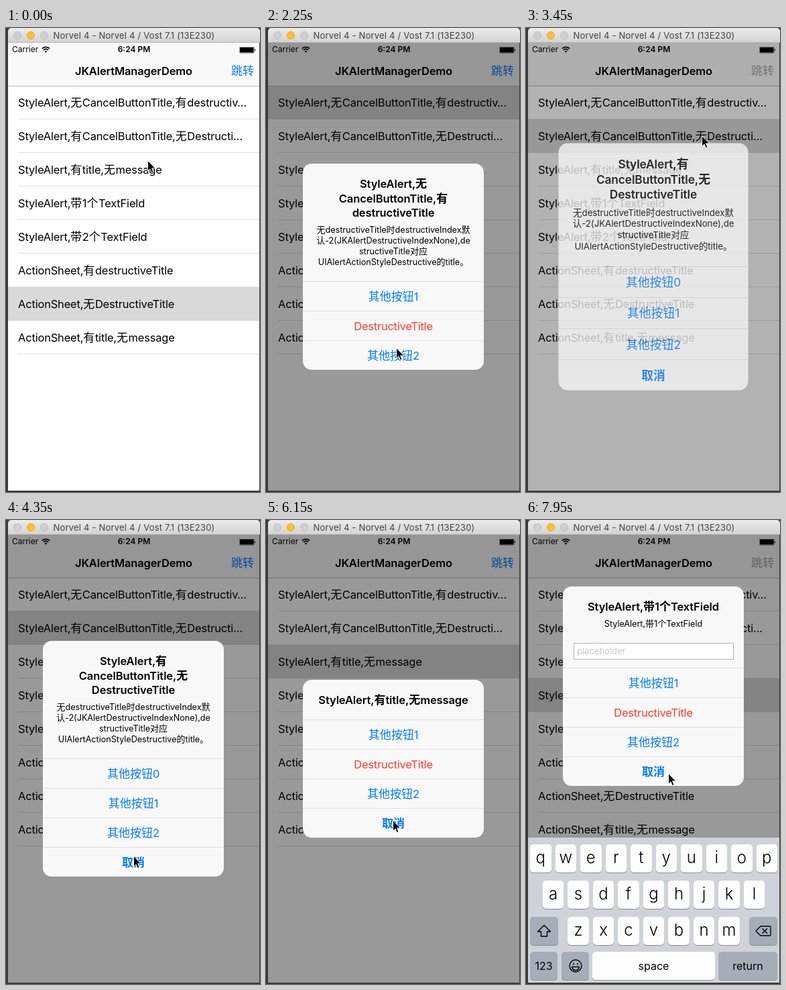
Recreate the animation shown at these times as an HTML page. Size 379 by 691 pixels, loop 8 s.

```html
<!DOCTYPE html>
<html lang="zh-CN">
<head>
<meta charset="utf-8">
<title>JKAlertManagerDemo</title>
<style>
* { box-sizing: border-box; }
html, body { margin: 0; width: 100%; height: 100%; overflow: hidden; background: #3a3a3a; }
body { position: relative; font: 400 16.5px Inter, "Noto Sans CJK SC", "Noto Sans CJK", sans-serif; letter-spacing: -.24px; color: #000; white-space: nowrap; }
div, svg { position: absolute; }
i { font: normal 17px/0 "Noto Sans CJK SC", "Noto Sans CJK", sans-serif; font-weight: inherit; letter-spacing: 0; }

.bar { left: 3px; top: 0; width: 376px; height: 22px; border-radius: 5px 5px 0 0; background: linear-gradient(#ebebeb, #d3d3d3); border-bottom: 1px solid #b4b4b4; font-size: 13px; line-height: 23px; letter-spacing: .2px; color: #424242; text-align: center; }
.light { top: 5px; width: 12px; height: 12px; border-radius: 50%; background: #d0d0d0; border: 1px solid #bcbcbc; }
.light.on { background: #fdbd30; border-color: #e6a72a; }

.screen { left: 3px; top: 22px; width: 375px; height: 667px; overflow: hidden; background: #fefefe; }
.nav { width: 375px; height: 65px; background: #f9f9f9; border-bottom: 1px solid #bcbcbc; }
.nav div { line-height: 20px; }
.carrier { left: 6px; top: 0; font-size: 12px; letter-spacing: 0; }
.clock { left: 0; top: 0; width: 376px; text-align: center; font-size: 12px; font-weight: 600; letter-spacing: 0; }
.title { width: 375px; top: 32px; text-align: center; font-weight: 600; letter-spacing: -.15px; }
.jump { right: 8px; top: 32px; }

.row { left: 0; width: 375px; height: 50px; line-height: 50px; padding-left: 15px; letter-spacing: -.19px; }
.row i { margin-right: .6px; }
.row::after { content: ""; position: absolute; left: 15px; right: 0; bottom: 0; height: 1px; background: #dfdfe0; }
.row.sel::before { content: ""; position: absolute; left: 0; top: 0; width: 375px; height: 50px; background: #d9d9d9; box-shadow: 0 -1px #e6e6e6; }
.row.sel::after { display: none; }
.row span { position: relative; }
.dim { width: 375px; height: 667px; background: #000; }

.alert { left: 52px; width: 270px; border-radius: 13px; overflow: hidden; background: #f8f8f8; text-align: center; }
.alert div { width: 270px; }
.head { font-weight: 600; letter-spacing: -.1px; line-height: 22px; }
.msg { font-size: 12.7px; line-height: 16px; letter-spacing: -.05px; }
.msg i { font-size: 13px; }
.btn { height: 44px; line-height: 44px; border-top: 1px solid #dedee0; color: #007aff; }
.btn.red { color: #ff3b30; }
.btn.bold { font-weight: 600; }
.alert .field { left: 16px; top: 84px; width: 239px; height: 25px; padding-left: 4px; line-height: 23px; border: 1px solid #b4b4b4; background: #fff; color: #c6c6ca; font-size: 13px; letter-spacing: 0; text-align: left; }

.keys { top: 451px; width: 375px; height: 216px; background: #cfd3d9; }
.key { height: 42px; line-height: 39px; border-radius: 5px; background: #fdfdfd; box-shadow: 0 1px 0 #898c91; text-align: center; font-size: 24px; font-weight: 300; letter-spacing: 0; }
.key.wide { font-size: 16px; font-weight: 400; line-height: 42px; }
.key.dark { background: #a6adb8; }
.key svg { left: 50%; top: 50%; margin: -12px; fill: none; stroke: #000; stroke-width: 1.4; stroke-linejoin: round; stroke-linecap: round; }
#cursor { left: 0; top: 0; overflow: visible; }
</style>
</head>
<body>
<div class="bar">
  <div class="light" style="left:8px"></div>
  <div class="light on" style="left:28px"></div>
  <div class="light" style="left:48px"></div>
  <span>Norvel 4 - Norvel 4 / Vost 7.1 (13E230)</span>
</div>
<div class="screen" id="screen">
  <div class="nav" id="nav">
    <div class="carrier">Carrier</div>
    <svg style="left:50px;top:5px" width="13" height="10" viewBox="0 0 13 10" fill="none" stroke="#000" stroke-width="1.8">
      <path d="M.8 3.6a8.2 8.2 0 0 1 11.4 0M2.9 5.8a5.1 5.1 0 0 1 7.2 0"/>
      <path d="M6.5 9.8L4.6 7.8a2.8 2.8 0 0 1 3.8 0z" fill="#000" stroke="none"/>
    </svg>
    <div class="clock">6:24 PM</div>
    <svg style="left:345px;top:6px" width="26" height="10">
      <rect x=".25" y=".25" width="22" height="9" rx="1.8" fill="none" stroke="#000" stroke-width=".5"/>
      <rect x="1" y="1" width="20.5" height="7.5" rx="1"/>
      <path d="M23.2 3.2a1.6 1.6 0 0 1 0 3z"/>
    </svg>
    <div class="title">JKAlertManagerDemo</div>
    <div class="jump" id="jump">跳转</div>
  </div>
</div>
<svg id="cursor" width="13" height="20">
  <path d="M.5 .5V16.2L4 12.9L6.4 18.6L9 17.5L6.6 11.9H11.6Z" fill="#000" stroke="#fff" stroke-width="1"/>
</svg>
<script>
const LOOP = 8000, STEP = 150;
const screenEl = document.getElementById('screen');
const jump = document.getElementById('jump');
const cursor = document.getElementById('cursor');

const mixed = s => s.replace(/[\u3000-\u9fff]+/g, '<i>$&</i>');

function add(parent, cls, html = '', style = {}) {
  const el = document.createElement('div');
  el.className = cls;
  el.innerHTML = html;
  for (const k in style) el.style[k] = typeof style[k] === 'number' ? style[k] + 'px' : style[k];
  parent.appendChild(el);
  return el;
}

jump.innerHTML = mixed(jump.textContent);

const rows = [
  'StyleAlert,无CancelButtonTitle,有destructiv…',
  'StyleAlert,有CancelButtonTitle,无Destructi…',
  'StyleAlert,有title,无message',
  'StyleAlert,带1个TextField',
  'StyleAlert,带2个TextField',
  'ActionSheet,有destructiveTitle',
  'ActionSheet,无DestructiveTitle',
  'ActionSheet,有title,无message'
].map((s, i) => add(screenEl, 'row', `<span>${mixed(s)}</span>`, { top: 64 + 50 * i }));
screenEl.appendChild(document.getElementById('nav'));
const dim = add(screenEl, 'dim');

// Keyboard
const keys = add(screenEl, 'keys');
const key = (left, top, width, html, cls = '') => add(keys, 'key ' + cls, html, { left, top, width });
const icon = d => `<svg width="24" height="24"><path d="${d}"/></svg>`;
[['qwertyuiop', 3, 10], ['asdfghjkl', 21.75, 64], ['zxcvbnm', 59.25, 118]].forEach(([s, x, y]) =>
  [...s].forEach((c, i) => key(x + 37.5 * i, y, 31.5, c)));
key(3, 118, 42, icon('M12 3.5L21.5 13H16.5V20H7.5V13H2.5Z'), 'dark');
key(330, 118, 42, icon('M8 5H21.5Q23 5 23 6.5V17.5Q23 19 21.5 19H8L1 12ZM11 8.7L17.6 15.3M17.6 8.7L11 15.3'), 'dark');
key(3, 170, 41, '123', 'wide dark');
key(50, 170, 41, icon('M3 12a9 9 0 1 0 18 0a9 9 0 1 0-18 0M6.5 13.5H17.5Q16.5 18.5 12 18.5T6.5 13.5M9 8.2V10M15 8.2V10'), 'wide dark');
key(96, 170, 183, 'space', 'wide');
key(284, 170, 88, 'return', 'wide dark');

// Alerts: each shows at `from` and is dismissed at `to`
const note = ['无destructiveTitle时destructiveIndex默', '认-2(JKAlertDestructiveIndexNone),de',
  'structiveTitle对应', 'UIAlertActionStyleDestructive的title。'];
const choices = ['其他按钮1', 'DestructiveTitle', '其他按钮2'];
const alerts = [
  { from: 450, to: 2250, head: ['StyleAlert,无', 'CancelButtonTitle,有', 'destructiveTitle'],
    msg: note, size: 175, btns: choices },
  { from: 3300, to: 4350, head: ['StyleAlert,有', 'CancelButtonTitle,无', 'DestructiveTitle'],
    msg: note, size: 175, btns: ['其他按钮0', '其他按钮1', '其他按钮2', '取消'] },
  { from: 5100, to: 6150, head: ['StyleAlert,有title,无message'],
    msg: [], size: 59, btns: [...choices, '取消'] },
  { from: 7050, to: LOOP, head: ['StyleAlert,带1个TextField'],
    msg: ['StyleAlert,带1个TextField'], size: 121, btns: [...choices, '取消'], field: true }
];
for (const a of alerts) {
  const height = a.size + 44 * a.btns.length;
  const mid = a.field ? 225.5 : 333.5;
  a.el = add(screenEl, 'alert', '', { height, top: Math.round(mid - height / 2) });
  a.head.forEach((s, i) => add(a.el, 'head', mixed(s), { top: 19 + 21.5 * i }));
  const msgTop = a.field ? 48 : 91;
  a.msg.forEach((s, i) => add(a.el, 'msg', mixed(s), { top: msgTop + 16 * i }));
  if (a.field) add(a.el, 'field', 'placeholder');
  a.btns.forEach((s, i) => {
    const cls = s === '取消' ? ' bold' : s[0] === 'D' ? ' red' : '';
    add(a.el, 'btn' + cls, mixed(s), { top: a.size + 44 * i });
  });
}

// Pointer stops: time, x, y
const path = [
  [0, 211, 197], [300, 190, 110], [750, 190, 110], [1050, 192, 182], [1950, 194, 476],
  [2300, 194, 476], [3000, 262, 160], [3550, 262, 160], [4200, 190, 500], [4400, 190, 500],
  [4950, 178, 213], [5550, 178, 213], [5700, 181, 262], [5850, 181, 262], [6150, 189, 447],
  [6250, 189, 447], [6900, 178, 264], [7300, 178, 264], [7900, 212, 377], [LOOP, 212, 377]
];
function pointer(t) {
  const n = path.findIndex(p => p[0] > t);
  const [t0, x0, y0] = path[n - 1], [t1, x1, y1] = path[n];
  const u = (t - t0) / (t1 - t0), e = u * u * (3 - 2 * u);
  return [x0 + (x1 - x0) * e, y0 + (y1 - y0) * e];
}

// Critically damped spring from 0 to 1
function spring(ms) {
  const w = Math.max(0, ms) * .0183;
  return 1 - (1 + w) * Math.exp(-w);
}

function draw(now) {
  const t = Math.floor(now % LOOP / STEP) * STEP;
  let shade = 0, picked = 6, grey = false;
  alerts.forEach((a, i) => {
    const grow = spring(t - a.from);
    const show = grow * (1 - spring(t - a.to));
    a.el.style.opacity = show;
    a.el.style.visibility = show > .004 ? 'visible' : 'hidden';
    a.el.style.transform = grow > .997 ? 'none' : `scale(${1.2 - .2 * grow})`;
    shade = Math.max(shade, show);
    if (t >= a.from) picked = i;
    if (t > a.from && t < a.to) grey = true;
    if (a.field) keys.style.transform = `translateY(${216 * (1 - show)}px)`;
  });
  dim.style.opacity = shade * .4;
  jump.style.color = grey ? '#a4a4a4' : '#007aff';
  rows.forEach((r, i) => r.classList.toggle('sel', i === picked));
  const [x, y] = pointer(t);
  cursor.style.transform = `translate(${Math.round(x)}px, ${Math.round(y)}px)`;
}

const start = performance.now();
(function tick() {
  draw(performance.now() - start);
  requestAnimationFrame(tick);
})();
</script>
</body>
</html>
```
